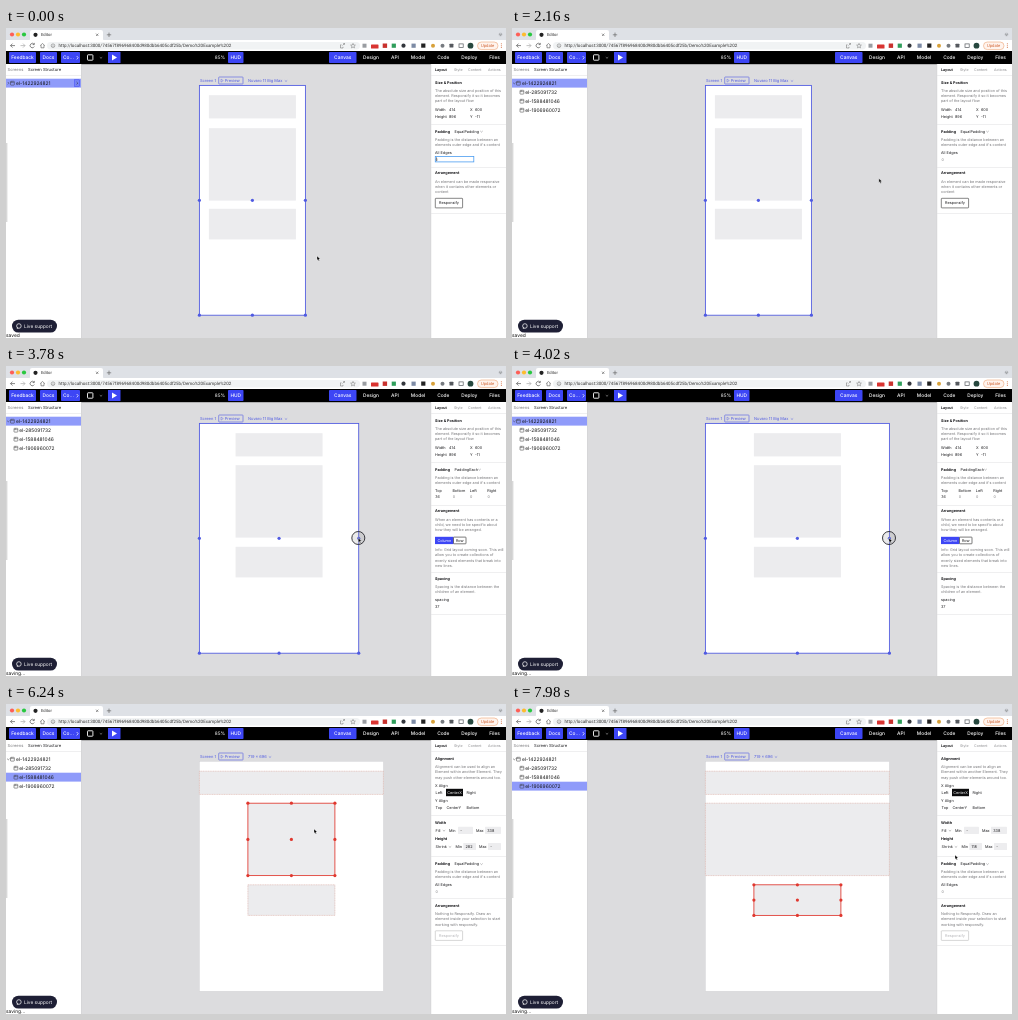
These frames come from a looping animation (500 px wide and 310 px high, 8 s). An HTML page:

```html
<!DOCTYPE html>
<html lang="en">
<head>
<meta charset="utf-8">
<title>Editor</title>
<style>
html, body { margin: 0; width: 100%; height: 100%; overflow: hidden; background: #dcdcde; }
svg { display: block; width: 100vw; height: 100vh; }
text { font-family: Inter, "Open Sans", sans-serif; white-space: pre; text-rendering: geometricPrecision; }
.chrome text { font-family: Roboto, Arial, sans-serif; }
</style>
</head>
<body>
<svg id="stage" viewBox="0 0 500 310" preserveAspectRatio="none">
  <defs>
    <linearGradient id="edge"><stop stop-color="#000" stop-opacity=".2"/><stop offset="1" stop-color="#000" stop-opacity="0"/></linearGradient>
  </defs>
  <g id="canvas"></g>
  <g id="base"></g>
  <g id="tree"></g>
  <g id="panel"></g>
  <g id="overlay"></g>
</svg>
<script>
const LOOP = 8000, STEP = 60;
const BLUE = '#3d46f5', LINE = '#4f5ae2', RED = '#e0382f', GREY = '#757578', INK = '#17171a';
const $ = id => document.getElementById(id);

const rect = (x, y, w, h, fill, more = '') =>
  `<rect x="${x}" y="${y}" width="${w}" height="${h}" fill="${fill}" ${more}/>`;
const dot = (x, y, r, fill, more = '') => `<circle cx="${x}" cy="${y}" r="${r}" fill="${fill}" ${more}/>`;
const path = (d, stroke, w = 0.6, fill = 'none') =>
  `<path d="${d}" fill="${fill}" stroke="${stroke}" stroke-width="${w}"/>`;
const text = (x, y, s, size = 3.8, fill = INK, more = '') =>
  `<text x="${x}" y="${y}" font-size="${size}" fill="${fill}" ${more}>${s}</text>`;
const mid = (x, y, s, size, fill, more = '') => text(x, y, s, size, fill, 'text-anchor="middle" ' + more);
const bold = (x, y, s) => text(x, y, s, 3.75, INK, 'font-weight="650"');
const lines = (y, list, gap = 5.3) => list.map((s, i) => text(429, y + i * gap, s, 3.75, GREY)).join('');
const rule = y => rect(425, y, 75, 0.5, '#dedee0');
const chevron = (x, y, c = GREY) => path(`M${x - 1.2} ${y - 0.5}l1.2 1.1 1.2-1.1`, c, 0.5);
const outline = (c, w = 0.7, more = '') => `stroke="${c}" stroke-width="${w}" ${more}`;

function browserBar() {
  let s = rect(0, 0, 500, 13, '#dee1e6') + rect(0, 12, 500, 11.5, '#fff');
  s += path('M22 13q2 0 2-2V4q0-2 2-2h69q2 0 2 2v7q0 2 2 2z', 'none', 0, '#fff');
  ['#fe5f57', '#febc2e', '#28c840'].forEach((c, i) => s += dot(6 + i * 6, 6.5, 2.1, c));
  s += dot(29.5, 6.8, 2.1, '#222') + text(35, 8.4, 'Editor', 4.2, '#333');
  s += path('M90 5.6l2.4 2.4m0-2.4l-2.4 2.4M103 4.6v4.4m-2.2-2.2h4.4', '#555', 0.6);
  s += dot(494.5, 6.5, 2, '#c8cbd0') + chevron(494.5, 6.5, '#444');
  s += path('M9 17.6H4.5m2-2l-2 2 2 2', '#555', 0.7) + path('M14.5 17.6H19m-2-2l2 2-2 2', '#aaa', 0.7);
  s += path('M28 16.2a2.2 2.2 0 1 0 .3 2.3M28.3 14.9v1.7h-1.7', '#555', 0.7);
  s += path('M34.2 17.6l2.3-2.1 2.3 2.1m-3.8-.5v2.700h3v-2.700', '#555', 0.6);
  s += rect(41, 14, 313, 7.4, '#f1f3f4', 'rx="3.7"');
  s += dot(47, 17.7, 1.8, 'none', outline('#666', 0.5)) + path('M47 17.3v1.5', '#666', 0.5);
  s += text(52.5, 19.3, 'http://localhost:3000/74567f896968400d980dbb6405cdf25b/Demo%20Example%202', 4.5, '#333');
  s += path('M337 18.8v1.2h-2.5v-3.2h1M336.5 17.5l2-2m-1.3 0h1.3v1.3', '#666', 0.5);
  s += path('M347 15.4l.7 1.6 1.7.1-1.3 1.1.4 1.7-1.5-.9-1.5.9.4-1.7-1.3-1.1 1.7-.1z', '#666', 0.45);
  s += rect(356.5, 15.7, 4, 4, '#9a9da2') + rect(365, 16.5, 7.5, 4, '#d93431', 'rx=".6"');
  s += rect(376.7, 15.5, 4.4, 4.4, '#c8322e') + rect(385.7, 15.6, 4.2, 4.2, '#2f9e5b');
  s += dot(397.5, 17.7, 2.1, '#33363c') + rect(405.5, 15.6, 4.2, 4.2, '#7d8ba5');
  s += rect(415.2, 15.5, 4.2, 4.2, '#222') + dot(427, 17.7, 2, '#d8a13a');
  s += dot(436.5, 17.7, 2, '#777b80') + rect(443.5, 15.7, 3.9, 3.9, '#55595e', 'rx=".6"');
  s += rect(453, 15.9, 4.2, 3.6, 'none', outline('#55595e', 0.7)) + dot(464.5, 17.7, 2.9, '#27483f');
  s += rect(471.5, 14, 20.5, 7.6, '#fff4ee', 'rx="3.8" ' + outline('#e9955f', 0.5));
  s += mid(481.7, 19.2, 'Update', 4.2, '#d0612f');
  [15.8, 17.7, 19.6].forEach(y => s += dot(495.3, y, 0.5, '#d0612f'));
  return `<g class="chrome">${s}</g>`;
}

function appBar() {
  const label = (x, s) => mid(x, 31.3, s, 4.85, '#fff', 'font-weight="500"');
  const button = (x, w, s) => rect(x, 24, w, 11, BLUE, 'rx=".8"') + label(x + w / 2, s);
  let s = rect(0, 23, 500, 13.2, '#000');
  s += button(3, 27, 'Feedback') + button(34, 17, 'Docs') + rect(55, 24, 19, 11, BLUE, 'rx=".8"');
  s += label(62.5, 'Co...') + path('M70.7 28l1.5 1.7-1.5 1.7', '#fff', 0.7);
  s += rect(81.5, 26.8, 5.4, 5.4, 'none', 'rx=".6" ' + outline('#fff', 0.9)) + chevron(95, 29.7, '#ddd');
  s += rect(102, 24, 12.5, 11, BLUE) + path('M106 26.6v6l5-3z', 'none', 0, '#fff');
  s += mid(214, 31.3, '85%', 4.7, '#fff') + button(222, 15.5, 'HUD') + button(323, 27.5, 'Canvas');
  [['Design', 365], ['API', 389], ['Model', 412], ['Code', 437.3], ['Deploy', 463.3], ['Files', 488.6]]
    .forEach(([name, x]) => s += label(x, name));
  return s;
}

function pageShell() {
  let s = rect(0, 36, 75, 274, '#fff') + rect(425, 36, 75, 274, '#fff');
  s += rect(75, 36, 0.5, 274, '#d0d0d2') + rect(424.7, 36, 0.5, 274, '#d0d0d2');
  s += text(1.5, 43.1, 'Screens', 4.1, '#77777a') + text(22, 43.1, 'Screen Structure', 4.15);
  s += rect(0, 47.5, 75, 0.5, '#dedee0') + rect(0, 115, 2.2, 79, 'url(#edge)');
  s += text(429, 42.9, 'Layout', 3.6, INK, 'font-weight="650"');
  [['Style', 448], ['Content', 462], ['Actions', 482]].forEach(([n, x]) => s += text(x, 42.9, n, 3.6, '#8a8a8d'));
  s += rule(47.5);
  s += rect(6, 291.7, 45, 12.8, '#1e1f35', 'rx="6.4"') + dot(12.9, 298, 2.3, 'none', outline('#fff', 0.7));
  s += path('M11.3 299.2l-.6 1.500 1.800-.5z', 'none', 0, '#fff');
  s += text(18, 299.7, 'Live support', 4.8, '#fff');
  return browserBar() + appBar() + s;
}

const padding = (y, kind) => bold(429, y, 'Padding') + text(448.5, y, kind) +
  chevron(kind === 'EqualPadding' ? 475.5 : 473.5, y - 1.3) +
  lines(y + 7.8, ['Padding is the distance between an', "elements outer edge and it's content"], 5);

function rootHead(kind) {
  return bold(429, 56, 'Size &amp; Position') +
    lines(64.2, ['The absolute size and position of this', 'element. Responsify it so it becomes', 'part of the layout flow'], 5) +
    text(429, 83, 'Width') + text(443, 83, '414') + text(464, 83, 'X') + text(469, 83, '600') +
    text(429, 89.5, 'Height') + text(443, 89.5, '896') + text(464, 89.5, 'Y') + text(469, 89.5, '-11') +
    rule(96) + padding(104.8, kind);
}

function freePanel(focused) {
  return rootHead('EqualPadding') + text(429, 125.7, 'All Edges') +
    (focused ? rect(429.3, 128.5, 38.5, 5.4, '#fff', outline('#4c9df0', 0.8)) + rect(430, 129.3, 0.5, 3.8, INK) : '') +
    text(429.5, 132.5, '0', 3.7, GREY) + rule(139) + bold(429, 146.3, 'Arrangement') +
    lines(154.8, ['An element can be made responsive', 'when it contains other elements or', 'content'], 5) +
    rect(429.3, 170.3, 27.3, 9.6, '#fff', 'rx=".6" ' + outline('#333', 0.6)) +
    mid(443, 176.4, 'Responsify') + rule(185);
}

function columnPanel() {
  const sides = ['Top', 'Bottom', 'Left', 'Right'];
  return rootHead('PaddingEach') +
    sides.map((s, i) => text(429 + i * 17.4, 125.7, s) + text(429.3 + i * 17.4, 132, i ? '0' : '36', 3.7, i ? GREY : INK)).join('') +
    rule(139) + bold(429, 146.3, 'Arrangement') +
    lines(154.8, ['When an element has contents or a', 'child, we need to be specific about', 'how they will be arranged.'], 5) +
    rect(429, 170.8, 18.5, 7.3, BLUE) + mid(438.3, 175.8, 'Column', 3.8, '#fff') +
    rect(447.5, 171.1, 12.5, 6.7, '#fff', 'rx=".6" ' + outline('#222', 0.6)) + mid(453.8, 175.8, 'Row') +
    lines(185.3, ['Info: Grid layout coming soon. This will', 'allow you to create collections of', 'evenly sized elements that break into', 'new lines.'], 5.1) +
    rule(206) + bold(429, 213.5, 'Spacing') +
    lines(222.2, ['Spacing is the distance between the', 'children of an element.'], 5) +
    text(429, 235.4, 'spacing') + text(429, 241.7, '37') + rule(248);
}

function childPanel(height, max, editing) {
  const field = (x, y, w, value, on) =>
    rect(x, y - 5.1, w, 7.2, '#ededef', 'rx=".6" ' + (on ? outline('#4c9df0', 0.9) : '')) + text(x + 2.2, y, value);
  return bold(429, 56, 'Alignment') +
    lines(64, ['Alignment can be used to align an', 'Element within another Element. They', 'may push other elements around too.']) +
    text(429, 82.5, 'X Align') + text(429.5, 89.8, 'Left') + rect(440, 84.8, 17, 7.4, '#0b0b0c') +
    mid(448.5, 89.8, 'CenterX', 3.8, '#fff') + text(460.5, 89.8, 'Right') +
    text(429, 98.2, 'Y Align') + text(429.5, 105.3, 'Top') + text(440.5, 105.3, 'CenterY') + text(460.5, 105.3, 'Bottom') +
    rule(111.5) + bold(429, 120, 'Width') + text(429.5, 127.8, 'Fill') + chevron(438, 126.6) +
    text(443, 127.8, 'Min') + field(452, 127.8, 15, '-') + text(470, 127.8, 'Max') + field(479, 127.8, 16, max, editing) +
    bold(429, 136.3, 'Height') + text(429.5, 144, 'Shrink') + chevron(444, 142.8) +
    text(449.5, 144, 'Min') + field(457.3, 144, 12.7, height) + text(473, 144, 'Max') + field(482, 144, 13, '-') +
    rule(152.5) + padding(161.3, 'EqualPadding') + text(429, 182.3, 'All Edges') + text(429.5, 188.5, '0', 3.7, GREY) +
    rule(194.5) + bold(429, 202.7, 'Arrangement') +
    lines(211, ['Nothing to Responsify. Draw an', 'element inside your selection to start', 'working with responsify.']) +
    rect(429.3, 226.8, 27.3, 9.6, '#fff', 'rx=".6" ' + outline('#bbb', 0.6)) +
    mid(443, 232.9, 'Responsify', 3.8, '#b5b5b8') + rule(241.5);
}

// Moments (ms) at which the user's actions take effect
const EXPAND = 840, BLUR = 540, RESPONSIFY = 2700, DRAG = [3480, 3960], RELEASE = 4200;
const PICK = [4500, 6000, 7680], FOCUS = [5160, 6900], FILL = [5460, 7200];
const IDS = ['el-1422924821', 'el-285091732', 'el-1588481046', 'el-1906960072'];
const HEIGHTS = ['88', '282', '118'];

// Pointer stops: time, x, y
const STOPS = [
  [0, 311, 228], [120, 311, 228], [720, 4, 56], [960, 4, 56], [1260, 59, 55], [1560, 59, 55],
  [2400, 443, 174], [2760, 443, 174], [3000, 444, 168], [3120, 440, 168], [3420, 299, 172],
  [3480, 299, 172], [3960, 377, 172], [4200, 377, 172], [4440, 290, 79], [4560, 290, 79],
  [4800, 372, 90], [5100, 486, 127], [5520, 486, 127], [5880, 295, 130], [6060, 293, 130],
  [6240, 308, 125], [6780, 486, 127], [7260, 486, 127], [7620, 290, 195], [7720, 290, 195],
  [7980, 443, 151]
];
const PRESSES = [[EXPAND - 60, EXPAND + 120], [RESPONSIFY - 120, RESPONSIFY], [DRAG[0] - 60, RELEASE - 60],
  ...[...PICK, ...FOCUS].map(t => [t - 60, t + 60])];

const clamp = v => Math.max(0, Math.min(1, v));
const ease = p => p * p * (3 - 2 * p);

function pointer(t) {
  const i = STOPS.findIndex(s => s[0] > t);
  if (i < 0) return STOPS[STOPS.length - 1].slice(1);
  const [a, ax, ay] = STOPS[i - 1], [b, bx, by] = STOPS[i];
  const p = ease((t - a) / (b - a));
  return [ax + (bx - ax) * p, ay + (by - ay) * p];
}

// A 3 x 3 set of grips; the top row can be left out
function handles(x, y, w, h, color, firstRow = 0) {
  let s = rect(x, y, w, h, 'none', outline(color, 0.85));
  for (let i = firstRow * 3; i < 9; i++)
    s += dot(x + w * (i % 3) / 2, y + h * Math.floor(i / 3) / 2, 1.6, color);
  return s;
}

function drawCanvas(t, picked) {
  const w = 106 + 78 * ease(clamp((t - DRAG[0]) / (DRAG[1] - DRAG[0])));
  const frameX = 193.4, frameY = 57.4, frameH = 229.8;
  const left = frameX + w / 2 - 43.5;
  const up = t >= RESPONSIFY ? 1 : 0;
  const rows = [[67.2, 23.2], [100.2 - up, 72.4], [180.8, 30.6]];
  let s = rect(75, 36, 350, 274, '#dcdcde') + rect(frameX, frameY, w, frameH, '#fff', outline('#cfcfd2', 0.4));
  s += text(194, 54.2, 'Screen 1', 4, LINE);
  s += rect(212.7, 49, 24.3, 7, 'none', 'rx=".6" ' + outline(LINE, 0.6));
  s += path('M215 51.1v3l2.3-1.5z', LINE, 0.4) + text(218.7, 54.1, 'Preview', 4, LINE);
  const sized = t >= RELEASE;
  s += text(242, 54.2, sized ? '719 × 696' : 'Nuvaro 11 Big Max', 4, LINE) + chevron(sized ? 264 : 280, 52.9, LINE);
  let top = '';
  rows.forEach(([y, h], i) => {
    const full = t >= FILL[i];
    const x = full ? frameX : left, cw = full ? w : 87;
    s += rect(x, y, cw, h, '#ececee');
    if (picked === i + 1) top = handles(x, y, cw, h, RED);
    else if (picked) s += rect(x, y, cw, h, 'none', outline('#d9a79c', 0.5, 'stroke-dasharray="1.2 .5"'));
  });
  return s + (picked ? top : handles(frameX, frameY, w, frameH, LINE, 1));
}

function drawTree(t, picked) {
  const count = t >= EXPAND ? 4 : 1;
  let s = rect(0, 50.7 + picked * 9, 75, 8.9, '#8f9bfa');
  for (let i = 0; i < count; i++) {
    const x = i ? 8 : 4.5, y = 55.2 + i * 9;
    s += rect(x, y - 1.9, 3.8, 3.8, 'none', 'rx=".5" ' + outline('#333', 0.5)) +
      path(`M${x} ${y - 0.6}h3.8M${x + 1.3} ${y - 1.9}v1.3`, '#333', 0.4);
    s += text(i ? 13.2 : 10, y + 1.7, IDS[i], 4.9, '#111');
  }
  s += count > 1 ? chevron(2.3, 55.2, '#333') : path('M1.8 54l1.1 1.2-1.1 1.2', '#333', 0.5);
  if (t < 1740) s += rect(68.7, 51.8, 5, 6.7, '#7583f5', outline(BLUE, 0.5)) + path('M70.6 54l1.2 1.2-1.2 1.2', '#222', 0.5);
  return s;
}

function drawPanel(t, picked) {
  if (!picked) return t < RESPONSIFY ? freePanel(t < BLUR) : columnPanel();
  const k = picked - 1;
  const max = t >= FILL[k] ? '-' : t >= FOCUS[k] + 180 ? '' : '338';
  return childPanel(HEIGHTS[k], max, t >= FOCUS[k]);
}

function drawOverlay(t) {
  const [x, y] = pointer(t);
  const saving = t >= RESPONSIFY + 60 && !(t >= 5100 && t < FILL[0]);
  let s = text(0, 309, saving ? 'saving...' : 'saved', 4.9, '#111');
  if (PRESSES.some(([a, b]) => t >= a && t < b))
    s += dot(x, y, 6.5, '#888', 'fill-opacity=".18" ' + outline('#26262c', 0.9));
  return s + `<path transform="translate(${x} ${y})" d="M0 0v4.3l1-.9.7 1.6.8-.4-.7-1.5h1.4z" fill="#000" stroke="#fff" stroke-width=".35"/>`;
}

$('base').innerHTML = pageShell();

const cache = {};
function put(id, html) {
  if (cache[id] !== html) $(id).innerHTML = cache[id] = html;
}

function render(t) {
  const picked = PICK.filter(p => t >= p).length;
  put('canvas', drawCanvas(t, picked));
  put('tree', drawTree(t, picked));
  put('panel', drawPanel(t, picked));
  put('overlay', drawOverlay(t));
}

const start = performance.now();
function tick() {
  const t = (performance.now() - start) % LOOP;
  render(Math.floor(t / STEP) * STEP);
  requestAnimationFrame(tick);
}
tick();
</script>
</body>
</html>
```
